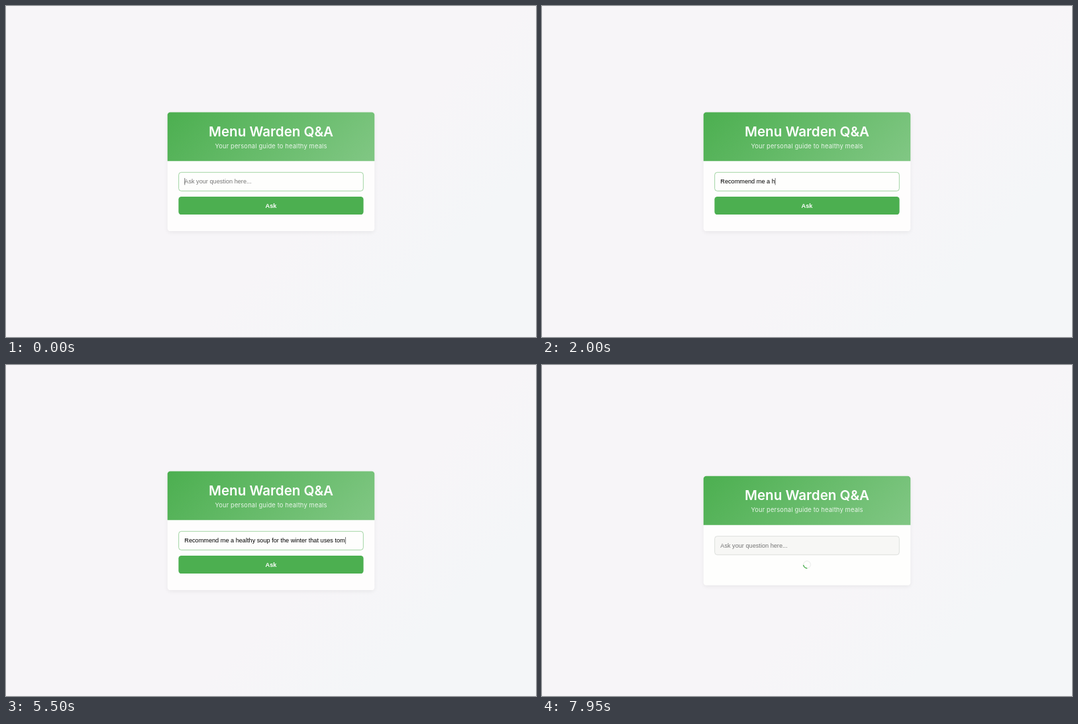
An HTML page that plays this animation: 800x500 px, repeating every 8 s.

```html
<!DOCTYPE html>
<html lang="en">
<head>
<meta charset="utf-8">
<title>Menu Warden Q&amp;A</title>
<style>
  html, body { margin: 0; width: 100%; height: 100%; overflow: hidden; }
  body { background: linear-gradient(135deg, #f7f5f8 60%, #f4f6f8 80%); }
  /* laid out at 1536 x 960, shown at 800 x 500 */
  #stage {
    position: absolute; width: 1536px; height: 960px;
    transform: scale(calc(800 / 1536)); transform-origin: 0 0;
    font: 17.6px "Liberation Sans", Arial, sans-serif;
  }
  #card, #card div { position: absolute; box-sizing: border-box; }
  #card {
    left: 468px; top: 307.5px; width: 600px; height: 345px;
    border-radius: 8px; background: #fefdfd;
    box-shadow: 0 4px 12px rgba(0, 0, 0, .06);
  }
  #card .header {
    width: 100%; height: 142px; border-radius: 8px 8px 0 0;
    background: linear-gradient(135deg, #4caf50, #81c784);
    color: #fff; text-align: center; font-family: Inter, sans-serif;
  }
  .header div { width: 100%; white-space: nowrap; }
  .title { top: 26.5px; font-size: 39.5px; font-weight: 600; line-height: 60px; }
  .subtitle { top: 87px; font-size: 18px; line-height: 24px; letter-spacing: .015em; opacity: .85; }
  #card .input {
    left: 32px; top: 174px; width: 536px; height: 55px; padding-left: 16px;
    border: 1px solid #4caf50; border-radius: 8px; background: #fefefd;
    display: flex; align-items: center; white-space: pre;
  }
  #text.empty { color: #757575; }
  #card #caret { left: 16px; width: 2px; height: 20px; background: #777; }
  .button {
    left: 32px; top: 245px; width: 536px; height: 52px; border-radius: 8px;
    background: #4caf50; color: #fff; font-weight: bold;
    text-align: center; line-height: 52px;
  }
  #spinner {
    left: 288px; top: 245px; width: 24px; height: 24px; border-radius: 50%;
    border: 3px solid #f0f1f0; border-top-color: #4caf50; display: none;
  }
  #card.loading { top: 321.5px; height: 317px; background: #fefefd; }
  #card.loading .input { background: #f7f7f5; border-color: #c4c8c4; }
  .loading .button, .loading #caret { display: none; }
  .loading #spinner { display: block; }
</style>
</head>
<body>
<div id="stage">
  <div id="card">
    <div class="header">
      <div class="title">Menu Warden Q&amp;A</div>
      <div class="subtitle">Your personal guide to healthy meals</div>
    </div>
    <div class="input"><span id="text"></span><div id="caret"></div></div>
    <div class="button">Ask</div>
    <div id="spinner"></div>
  </div>
</div>
<script>
  const LOOP = 8000, SUBMIT = 6550, SPIN = 1000, SPIN_ORIGIN = 6340;
  const PLACEHOLDER = 'Ask your question here...';
  const QUESTION = 'Recommend me a healthy soup for the winter that uses tomato.';
  // typing pace: [ms, characters typed], even in between
  const PACE = [[350, 0], [550, 2], [2000, 16], [2600, 23], [3400, 28],
    [3800, 36], [4450, 43], [4600, 43], [5300, 55], [6000, 60]];
  const [card, text, caret, spinner] =
    ['card', 'text', 'caret', 'spinner'].map(id => document.getElementById(id));

  function typedCount(t) {
    const next = PACE.findIndex(([time]) => time > t);
    if (next === 0) return 0;
    if (next < 0) return QUESTION.length;
    const [t0, n0] = PACE[next - 1], [t1, n1] = PACE[next];
    return Math.floor(n0 + (n1 - n0) * (t - t0) / (t1 - t0));
  }

  function draw(t) {
    const loading = t >= SUBMIT;
    const typed = loading ? '' : QUESTION.slice(0, typedCount(t));
    card.classList.toggle('loading', loading);
    text.classList.toggle('empty', !typed);
    text.textContent = typed || PLACEHOLDER;
    caret.style.left = 16 + (typed ? text.offsetWidth : 0) + 'px';
    spinner.style.transform = `rotate(${(t - SPIN_ORIGIN) / SPIN * 360}deg)`;
  }

  function tick() {
    draw(performance.now() % LOOP);
    requestAnimationFrame(tick);
  }
  tick();
</script>
</body>
</html>
```
